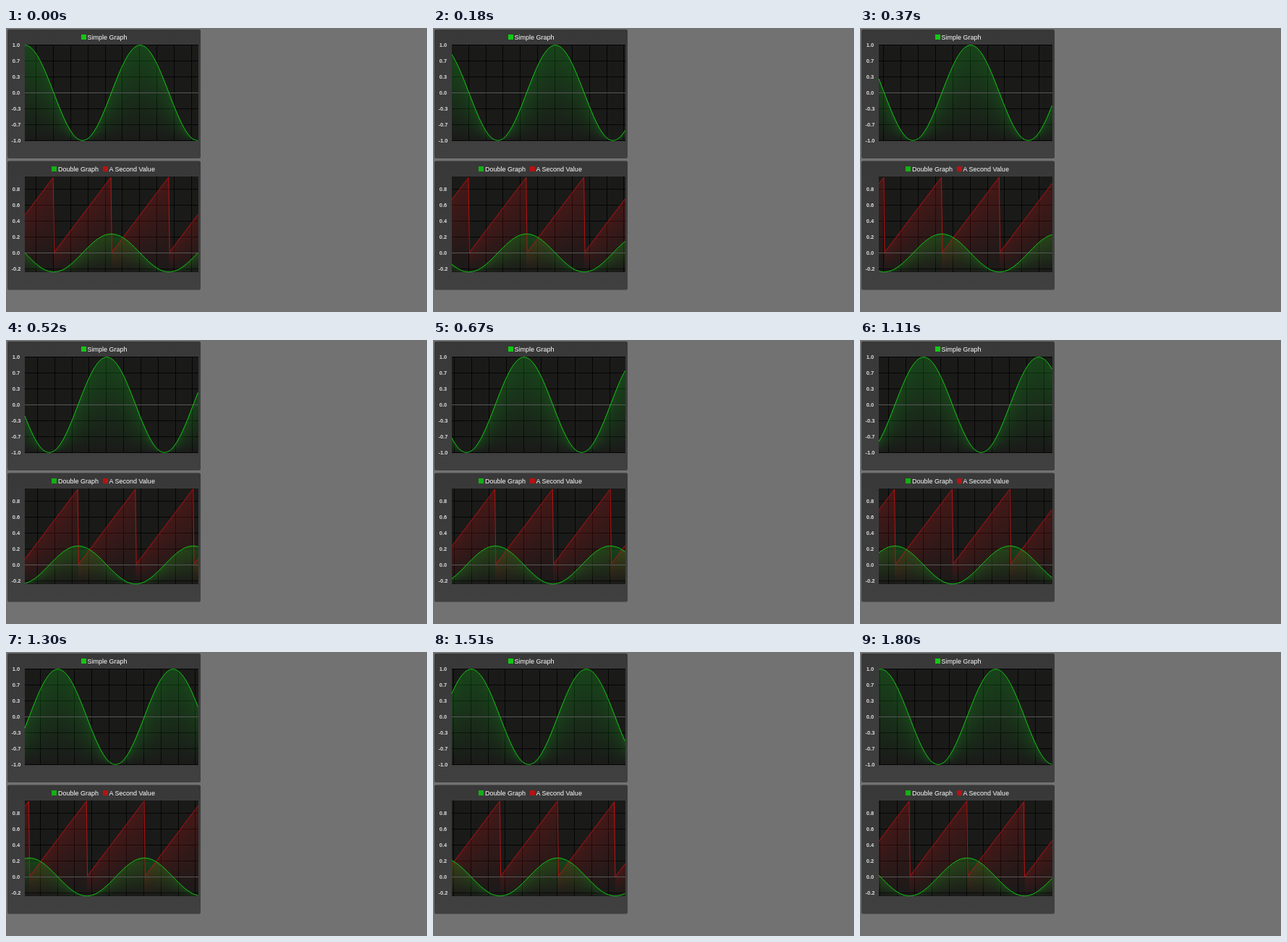
An HTML page that plays this animation: 582 px wide and 392 px high, repeating every 1830 ms.

```html
<!DOCTYPE html>
<html lang="en">
<head>
<meta charset="utf-8">
<title>Scrolling graphs</title>
<style>
  html, body { margin: 0; width: 100%; height: 100%; overflow: hidden; background: #727272; }
  svg { display: block; width: 582px; height: 392px; }
  text { font-family: "Liberation Sans", Arial, sans-serif; }
  .title { font-size: 9px; fill: #fff; }
  .label { font-size: 7.5px; font-weight: bold; fill: #dcdcdc; text-anchor: middle; }
  .crisp { shape-rendering: crispEdges; }
  .curve { fill: none; stroke-width: 1; stroke-linejoin: round; }
</style>
</head>
<body>
<svg id="stage" viewBox="0 0 582 392">
  <defs>
    <linearGradient id="panel" x2="0" y2="1">
      <stop stop-color="#383838"/><stop offset="1" stop-color="#404040"/>
    </linearGradient>
    <linearGradient id="greenFill" x2="0" y2="1">
      <stop stop-color="#14b41e" stop-opacity=".27"/><stop offset="1" stop-color="#14b41e" stop-opacity="0"/>
    </linearGradient>
    <linearGradient id="redFill" x2="0" y2="1">
      <stop stop-color="#b41414" stop-opacity=".27"/><stop offset="1" stop-color="#b41414" stop-opacity="0"/>
    </linearGradient>
  </defs>
</svg>
<script>
const LEFT = 26, WIDTH = 240, RIGHT = LEFT + WIDTH, HEIGHT = 132;
const SAW_PERIOD = 79.6, GRID_GAP = 23.85, SAMPLE = 1.3525;
const LOOP = 1830, STEP_MS = 30, STEP_PX = 2.705;
const LONG_STEPS = [6, 22, 28, 43, 49, 55]; // these steps last 10 ms more
const GREEN = '#14c814', RED = '#b81212';
const stage = document.getElementById('stage');

function add(parent, tag, attrs, text) {
  const node = document.createElementNS('http://www.w3.org/2000/svg', tag);
  for (const key in attrs) node.setAttribute(key, attrs[key]);
  if (text) node.textContent = text;
  parent.appendChild(node);
  return node;
}

function rect(parent, x, y, width, height, fill, extra) {
  return add(parent, 'rect', { x, y, width, height, fill, ...extra });
}

// Phase is counted in saw periods and is zero at a drop.
const cosine = phase => Math.cos(Math.PI * phase);
const sine = phase => -Math.sin(Math.PI * phase);
const saw = phase => 0.96 * (phase - Math.floor(phase));

function makeSeries(group, top, zero, { value, scale, color, fill }) {
  const columns = [];
  const area = add(group, 'g', { class: 'crisp' });
  for (let i = 0; i < WIDTH; i++) {
    columns.push(rect(area, LEFT + i, top, 1, 0, `url(#${fill})`));
  }
  const yAt = phase => zero - scale * value(phase);
  return { columns, yAt, color, bottom: top + HEIGHT };
}

function makeGraph({ y, labels, firstLabel, zero, legend, series }) {
  const top = y + 21.5 | 0;
  const group = add(stage, 'g', {});
  rect(group, 2, y, 267, 178, 'url(#panel)', { rx: 2 });
  rect(group, LEFT, top, WIDTH, HEIGHT, '#1a1a19', { class: 'crisp' });
  for (const [x, color, name] of legend) {
    rect(group, x, y + 7, 7, 7, color, { class: 'crisp' });
    add(group, 'text', { x: x + 9, y: y + 14, class: 'title' }, name);
  }
  labels.forEach((label, i) => {
    const lineY = firstLabel + 22 * i;
    rect(group, LEFT, lineY, WIDTH, 1, '#050505', { class: 'crisp' });
    add(group, 'text', { x: 14, y: lineY + 3.4, class: 'label' }, label);
  });
  const grid = add(group, 'path', { class: 'crisp', stroke: '#050505', fill: 'none' });
  const plots = series.map(s => makeSeries(group, top, zero, s));
  rect(group, LEFT, zero - 0.5, WIDTH, 1, '#565656', { class: 'crisp' });
  for (const plot of plots) {
    plot.line = add(group, 'path', { class: 'curve', stroke: plot.color });
  }
  return { top, grid, plots };
}

const graphs = [
  makeGraph({
    y: 2, firstLabel: 23, zero: 89.5,
    labels: ['1.0', '0.7', '0.3', '0.0', '-0.3', '-0.7', '-1.0'],
    legend: [[103.5, GREEN, 'Simple Graph']],
    series: [{ value: sine, scale: 65.8, color: GREEN, fill: 'greenFill' }]
  }),
  makeGraph({
    y: 183.5, firstLabel: 222, zero: 310.5,
    labels: ['0.8', '0.6', '0.4', '0.2', '0.0', '-0.2'],
    legend: [[63, '#14b014', 'Double Graph'], [133.5, RED, 'A Second Value']],
    series: [
      { value: saw, scale: 109.5, color: RED, fill: 'redFill' },
      { value: phase => -cosine(phase), scale: 26.2, color: GREEN, fill: 'greenFill' }
    ]
  })
];

function stepAt(time) {
  let step = 0, end = 0;
  for (;; step++) {
    end += STEP_MS + (LONG_STEPS.includes(step) ? 10 : 0);
    if (time < end) return step;
  }
}

function gridPath(shift, top) {
  const start = ((41.6 - LEFT - shift) % GRID_GAP + GRID_GAP) % GRID_GAP;
  let path = '';
  for (let x = LEFT + start; x < RIGHT; x += GRID_GAP) {
    path += `M${Math.floor(x) + 0.5} ${top}v${HEIGHT}`;
  }
  return path;
}

function drawSeries({ columns, yAt, line, bottom }, shift) {
  const phaseAt = x => (x + shift - 66) / SAW_PERIOD;
  columns.forEach((column, i) => {
    const y = yAt(phaseAt(LEFT + i + 0.5));
    column.setAttribute('y', y);
    column.setAttribute('height', Math.max(0, bottom - y));
  });
  const points = [];
  for (let x = LEFT; x <= RIGHT; x += SAMPLE) {
    points.push(x.toFixed(2) + ' ' + yAt(phaseAt(x)).toFixed(2));
  }
  line.setAttribute('d', 'M' + points.join('L'));
}

function draw(time) {
  const shift = stepAt(time % LOOP) * STEP_PX;
  for (const { top, grid, plots } of graphs) {
    grid.setAttribute('d', gridPath(shift, top));
    for (const plot of plots) drawSeries(plot, shift);
  }
}

const startTime = performance.now();
function tick() {
  draw(performance.now() - startTime);
  requestAnimationFrame(tick);
}
tick();
</script>
</body>
</html>
```
